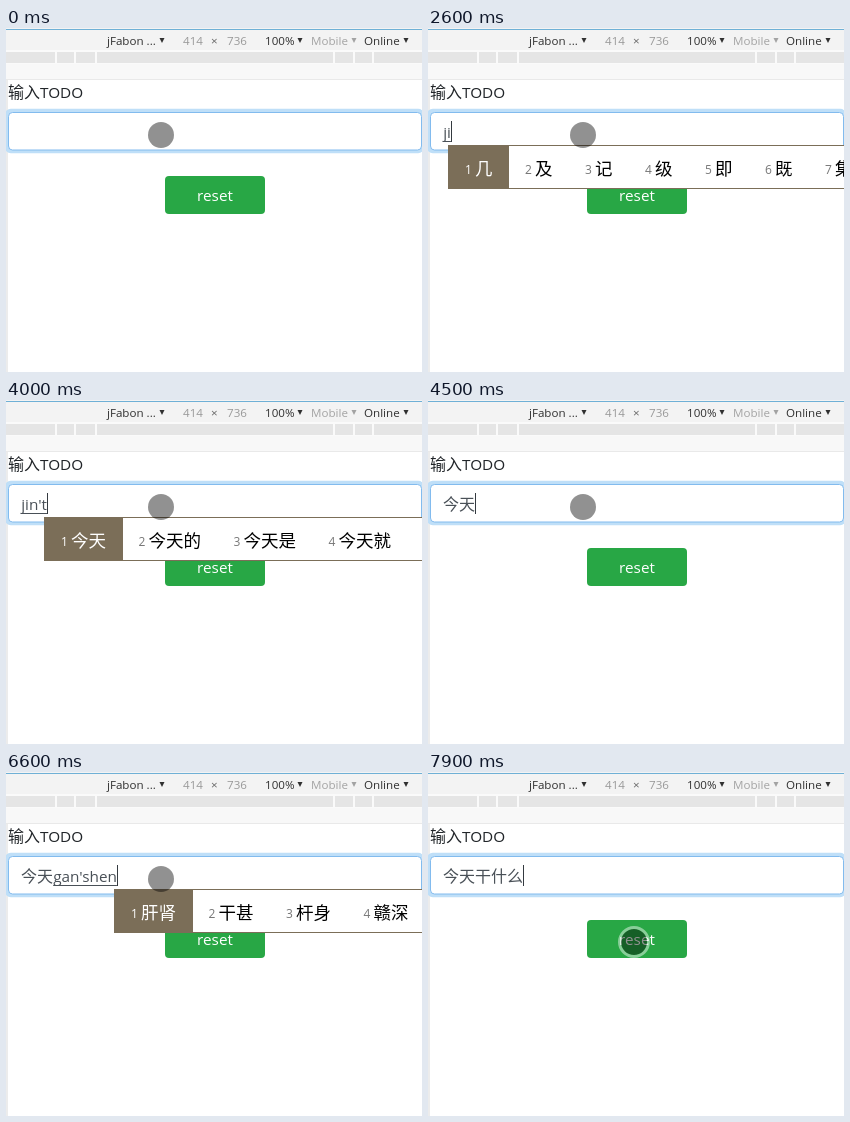
These frames come from a looping animation (416 by 344 pixels, 8000 ms). An HTML page:

```html
<!DOCTYPE html>
<html lang="zh-CN">
<head>
<meta charset="utf-8">
<title>TODO</title>
<style>
html, body { margin: 0; width: 100%; height: 100%; overflow: hidden; background: #fff; }
svg { display: block; width: 416px; height: 344px; }
text { font-family: "Open Sans", "Noto Sans", sans-serif; font-size: 15.3px; white-space: pre; }
.bar { font-size: 11.6px; }
.cjk { font-family: "Noto Sans CJK SC", "Noto Sans CJK JP", "Noto Sans CJK", sans-serif; font-size: 16px; }
</style>
</head>
<body>
<svg id="stage" viewBox="0 0 416 344"></svg>
<script>
const LOOP = 8000, BLINK = 530, BROWN = '#7b6e58';
const stage = document.getElementById('stage');

function add(parent, tag, attrs, content) {
  const node = document.createElementNS('http://www.w3.org/2000/svg', tag);
  for (const key in attrs) node.setAttribute(key, attrs[key]);
  if (content !== undefined) node.textContent = content;
  parent.appendChild(node);
  return node;
}
const rect = (parent, x, y, width, height, fill, extra) =>
  add(parent, 'rect', { x, y, width, height, fill, ...extra });
const text = (parent, x, y, str, fill, extra) =>
  add(parent, 'text', { x, y, fill, ...extra }, str);
const cjk = (parent, x, y, str, fill, size = 16) =>
  text(parent, x, y, str, fill, { class: 'cjk', style: `font-size:${size}px` });

function drawPage() {
  rect(stage, 0, 0, 416, 344, '#fff');
  rect(stage, 0, 0, 416, 22, '#f3f3f3');
  rect(stage, 0, 1, 416, 1, '#6fb0d6');
  rect(stage, 0, 22, 416, 14, '#fafafa');
  const ruler = [0, 51, 70, 91, 329, 349, 368, 418];
  ruler.slice(0, -1).forEach((x, i) => rect(stage, x, 24, ruler[i + 1] - x - 2, 11, '#e5e5e5'));
  rect(stage, 0, 36, 416, 15, '#f8f8f8');
  rect(stage, 0, 51, 416, 1, '#e9e9e9');
  rect(stage, 0, 52, 2, 292, '#ececec');

  const dark = '#303030', pale = '#999';
  const labels = [
    [101, 'jFabon ...', dark, 153], [177, '414', pale], [205, '×', '#666'], [221, '736', pale],
    [259, '100%', dark, 291], [305, 'Mobile', '#a3a3a3', 345], [358, 'Online', dark, 397]
  ];
  for (const [x, str, fill, arrow] of labels) {
    text(stage, x, 17, str, fill, { class: 'bar' });
    if (arrow) add(stage, 'path', { d: `M${arrow + .5} 10h5l-2.5 5z`, fill });
  }

  cjk(stage, 2, 70, '输入', '#212529');
  text(stage, 34, 70, 'TODO', '#212529');
  rect(stage, -1.2, 80.8, 419.4, 44.4, '#bfdff8', { rx: 6 });
  rect(stage, 2.5, 84.5, 413, 37.5, '#fff', { rx: 4, stroke: '#82bbee' });
  rect(stage, 159, 148, 100, 38, '#28a745', { rx: 4 });
  text(stage, 209, 173, 'reset', '#fff', { 'text-anchor': 'middle' });
}

// start time, committed text, pinyin being typed, candidates, hint row
const states = [
  [300, '', ''],
  [2100, '', 'j', '就 级 家 加 进 将 见'],
  [2550, '', 'ji', '几 及 记 级 即 既 集'],
  [3050, '', 'jin', '进 金 锦 仅 禁 近 今', true],
  [3900, '', "jin't", '今天 今天的 今天是 今天就'],
  [4150, '', "jin'tian", '今天 金天 仅添 近天'],
  [4450, '今天', ''],
  [5450, '今天', 'g', '给 个 跟 该 过 高 刚'],
  [5800, '今天', 'ga', '嘎 噶 尬 该 旮 咖 钆'],
  [6050, '今天', 'gan', '干 感 赶 敢 肝 甘 杆'],
  [6350, '今天', "gan's", '干啥 干事 干涉 感受'],
  [6450, '今天', "gan'sh", '干啥 干事 干涉 感受'],
  [6550, '今天', "gan'shen", '肝肾 干甚 杆身 赣深'],
  [6700, '今天', "gan'shenme", '干什么 敢什么 感什么'],
  [6830, '今天干什么', '']
];

function drawPopup(left, words, hint) {
  rect(entry, left + .5, 117.5, 440, hint ? 69 : 43, '#fff', { stroke: BROWN });
  if (hint) {
    rect(entry, left, 160, 440, 1, BROWN);
    const tip = cjk(entry, left + 9, 178, '点击前往设置页面开启模糊音', '#666', 13);
    add(tip, 'tspan', { 'font-size': 14 }, '<in,ing>');
    add(tip, 'tspan', {}, '。');
  }
  let x = left;
  words.split(' ').forEach((word, i) => {
    const badge = hint && word === '禁';
    const width = badge ? 66 : 42.5 + word.length * 17.5;
    if (!i) rect(entry, x, 117, Math.round(width) + 1, 44, BROWN);
    text(entry, x + 17, 146, i + 1, i ? '#777' : '#fff', { style: 'font-size:12px' });
    if (badge) {
      rect(entry, x + 30, 132.5, 18, 17.5, '#e0401c', { stroke: '#3c2a22', 'stroke-width': 2 });
      cjk(entry, x + 33.5, 145.5, word, '#fff', 11);
    } else {
      cjk(entry, x + 27, 147, word, i ? '#000' : '#fff', 17.5);
    }
    x += width;
  });
}

function drawEntry([, done, typing, words, hint]) {
  entry.replaceChildren();
  let end = 15.2 + done.length * 16;
  if (done) cjk(entry, 15, 110, done, '#495057');
  if (typing) {
    const start = end;
    end += text(entry, start, 110, typing, '#495057').getComputedTextLength();
    rect(entry, start, 113, end - start, 1, '#495057');
    drawPopup(Math.round(end) - 3, words, hint);
  }
  caret.setAttribute('x', Math.round(end));
}

drawPage();
const caret = rect(stage, 15, 93, 1, 21, '#343a40');
const entry = add(stage, 'g', {});
const pointer = add(stage, 'g', {});
add(pointer, 'circle', { r: 13, fill: '#000', 'fill-opacity': .43 });
const ring = add(pointer, 'circle', { r: 14.5, fill: 'none', stroke: '#fff', 'stroke-width': 3, 'stroke-opacity': .45 });

const ramp = (t, from, to) => Math.min(1, Math.max(0, (t - from) / (to - from)));
const ease = p => p * p * (3 - 2 * p);
let shown;

function update(t) {
  const state = states.findLast(s => s[0] <= t) || states[0];
  if (state !== shown) drawEntry(shown = state);
  const phase = (t - state[0] + 2 * BLINK) % (2 * BLINK);
  caret.setAttribute('visibility', phase < BLINK ? 'visible' : 'hidden');

  const p = ease(ramp(t, 7200, 7750));
  pointer.setAttribute('transform', `translate(${155 + 51 * p} ${107 + 63 * p})`);
  pointer.setAttribute('opacity', t < 2100 ? 1 - ramp(t, 1150, 1290) : 1);
  ring.setAttribute('visibility', t >= 7830 ? 'visible' : 'hidden');
}

const begin = performance.now();
function frame() {
  update((performance.now() - begin) % LOOP);
  requestAnimationFrame(frame);
}
frame();
</script>
</body>
</html>
```
